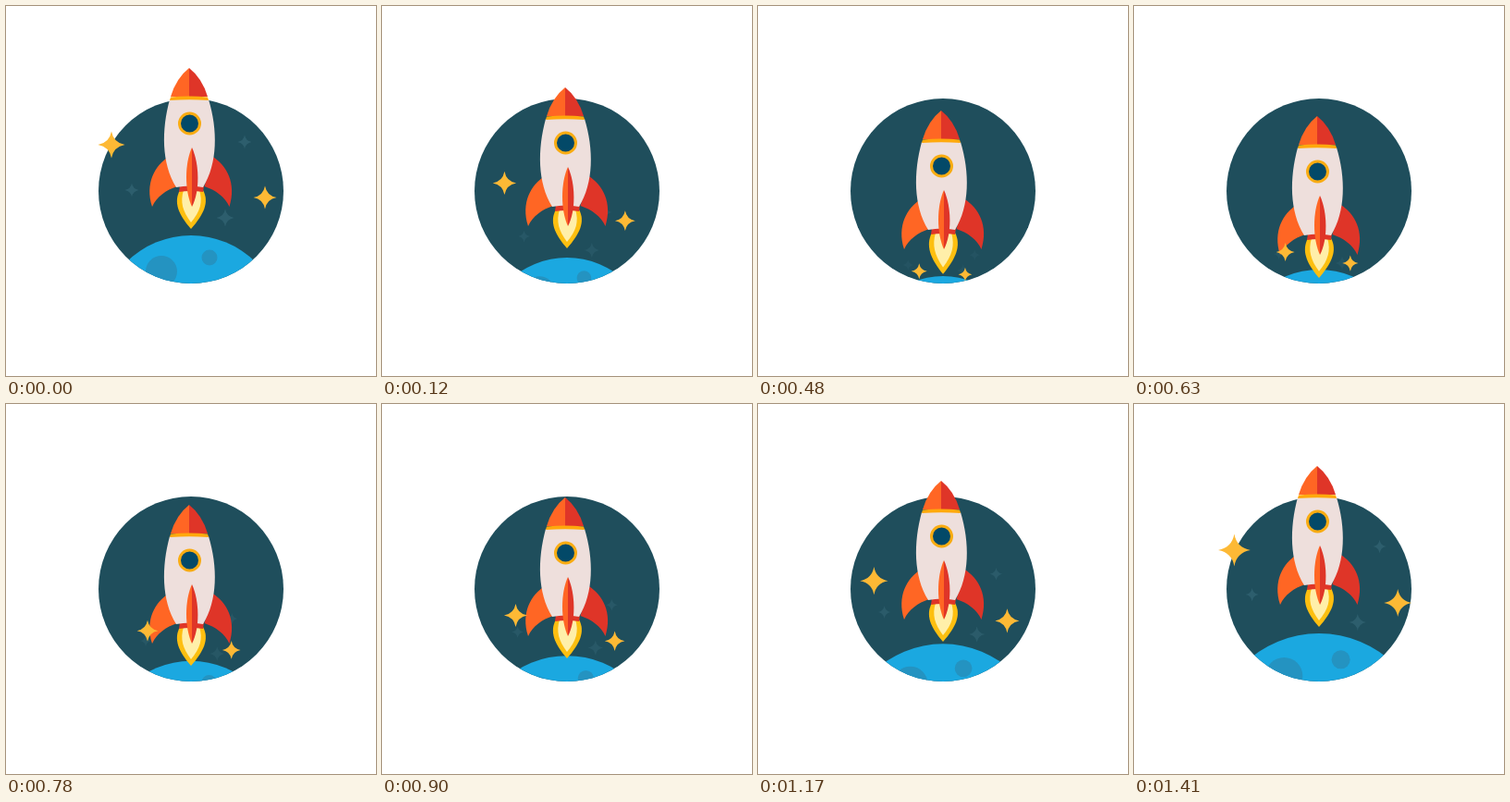
Recreate the animation shown at these times as an HTML page. Size 400 px wide and 400 px high, loop 1.68 s.

```html
<!DOCTYPE html>
<html>
<head>
<meta charset="utf-8">
<title>Rocket</title>
<style>
  html, body { margin: 0; height: 100%; overflow: hidden; background: #fff; }
  svg { display: block; width: 100vw; height: 100vh; }
  .orange { fill: #ff6624; }
  .red { fill: #df3528; }
</style>
</head>
<body>
<svg viewBox="0 0 400 400">
  <defs>
    <clipPath id="disc"><circle cx="200" cy="200" r="100"/></clipPath>
    <path id="star" d="M0-1Q.15-.15 1 0Q.15.15 0 1Q-.15.15-1 0Q-.15-.15 0-1Z"/>
    <path id="fin" d="M176 163C161 172 150 192 158 217C163 206 173 199 185 195Z"/>
  </defs>
  <circle cx="200" cy="200" r="100" fill="#1f4e5c"/>
  <g id="faint" fill="#3f7383"></g>
  <g clip-path="url(#disc)">
    <g id="planet">
      <circle cy="99" r="99" fill="#1ba8e0"/>
      <g fill="#2493c1">
        <circle cx="-32" cy="39" r="17"/>
        <circle cx="20" cy="24" r="8.5"/>
      </g>
    </g>
  </g>
  <g id="rocket">
    <g id="flame">
      <path fill="#fdbf10" d="M188 199C181 212 186 225 200 241C214 225 220 212 213 199Z"/>
      <path fill="#ffefa9" d="M192 199C188 212 191 222 200 234C210 222 213 212 209 199Z"/>
    </g>
    <use href="#fin" class="orange"/>
    <use href="#fin" class="red" transform="matrix(-1 0 0 1 399.5 0)"/>
    <path class="red" d="M188 194H214L213 201Q200 199 187 201Z"/>
    <path fill="#eedfdc" d="M177 101Q198 98 219 101C229 134 229 170 213 196Q199 193 184 196C168 170 168 134 177 101Z"/>
    <path class="orange" d="M198 67Q184 78 178 98H198Z"/>
    <path class="red" d="M198 67Q212 78 218 98H198Z"/>
    <path fill="#ffa90c" d="M178 98.5Q198 96.5 218 98.5L219 102Q198 100.5 177 102Z"/>
    <circle cx="198.5" cy="127" r="11" fill="#034968" stroke="#f9ac12" stroke-width="3"/>
    <path class="orange" d="M201 153C193 170 193 200 201 217Z"/>
    <path class="red" d="M201 153C209 170 210 200 201 217Z"/>
  </g>
  <g id="gold" fill="#fdb935"></g>
</svg>
<script>
const LOOP = 1680, STEP = 30, END = 1410;
const $ = id => document.getElementById(id);
const move = (el, transform) => el.setAttribute("transform", transform);

// Piecewise linear value through [time, value] points
function through(t, points) {
  const i = points.findIndex(([time]) => time > t);
  if (i < 0) return points.at(-1)[1];
  const [[t0, v0], [t1, v1]] = points.slice(i - 1);
  return v0 + (v1 - v0) * (t - t0) / (t1 - t0);
}

// Sink from start to low, then rise to end
const dip = (t, lowTime, start, low, end) => through(t, [[0, start], [lowTime, low], [END, end]]);

// Stars gather near the bottom of the disc, then spread out a little wider than before
const layers = [
  { id: "gold", lowTime: 420, floor: 295, squeeze: .25, spread: 1.065, drop: 8,
    shrink: .55, grow: 1.2, alpha: 1, lowAlpha: 1,
    stars: [[-86, 150, 14.5], [80, 207, 12.5]] },
  { id: "faint", lowTime: 240, floor: 299, squeeze: .45, spread: 1.13, drop: 7,
    shrink: .7, grow: .95, alpha: .45, lowAlpha: .08,
    stars: [[-64, 199, 7.5], [58, 147, 7.5], [37, 229, 9.5]] }
];

for (const layer of layers)
  $(layer.id).innerHTML = '<use href="#star"/>'.repeat(layer.stars.length);

function drawStars(layer, t) {
  const at = (start, low, end) => dip(t, layer.lowTime, start, low, end);
  const group = $(layer.id);
  const spread = at(1, layer.squeeze, layer.spread);
  const scale = at(1, layer.shrink, layer.grow);
  group.setAttribute("opacity", at(layer.alpha, layer.lowAlpha, layer.alpha));
  layer.stars.forEach(([x, y, r], i) => {
    const top = at(y, layer.floor, y + layer.drop);
    move(group.children[i], `translate(${200 + x * spread} ${top}) scale(${r * scale})`);
  });
}

function draw(time) {
  const t = Math.floor(time % LOOP / STEP) * STEP;
  const sink = through(t, [[0, 0], [240, 42], [480, 46], [570, 56], [END, 0]]);
  const thrust = 1 + .08 * Math.exp(-(((t - 520) / 100) ** 2));
  move($("rocket"), `translate(0 ${sink})`);
  move($("flame"), `translate(0 199) scale(1 ${thrust}) translate(0 -199)`);
  move($("planet"), `translate(200 ${dip(t, 270, 248, 302, 248)}) scale(${dip(t, 270, 1, .82, 1.18)})`);
  layers.forEach(layer => drawStars(layer, t));
}

let start;
function tick(now) {
  start ??= now;
  draw(now - start);
  requestAnimationFrame(tick);
}
draw(0);
requestAnimationFrame(tick);
</script>
</body>
</html>
```
